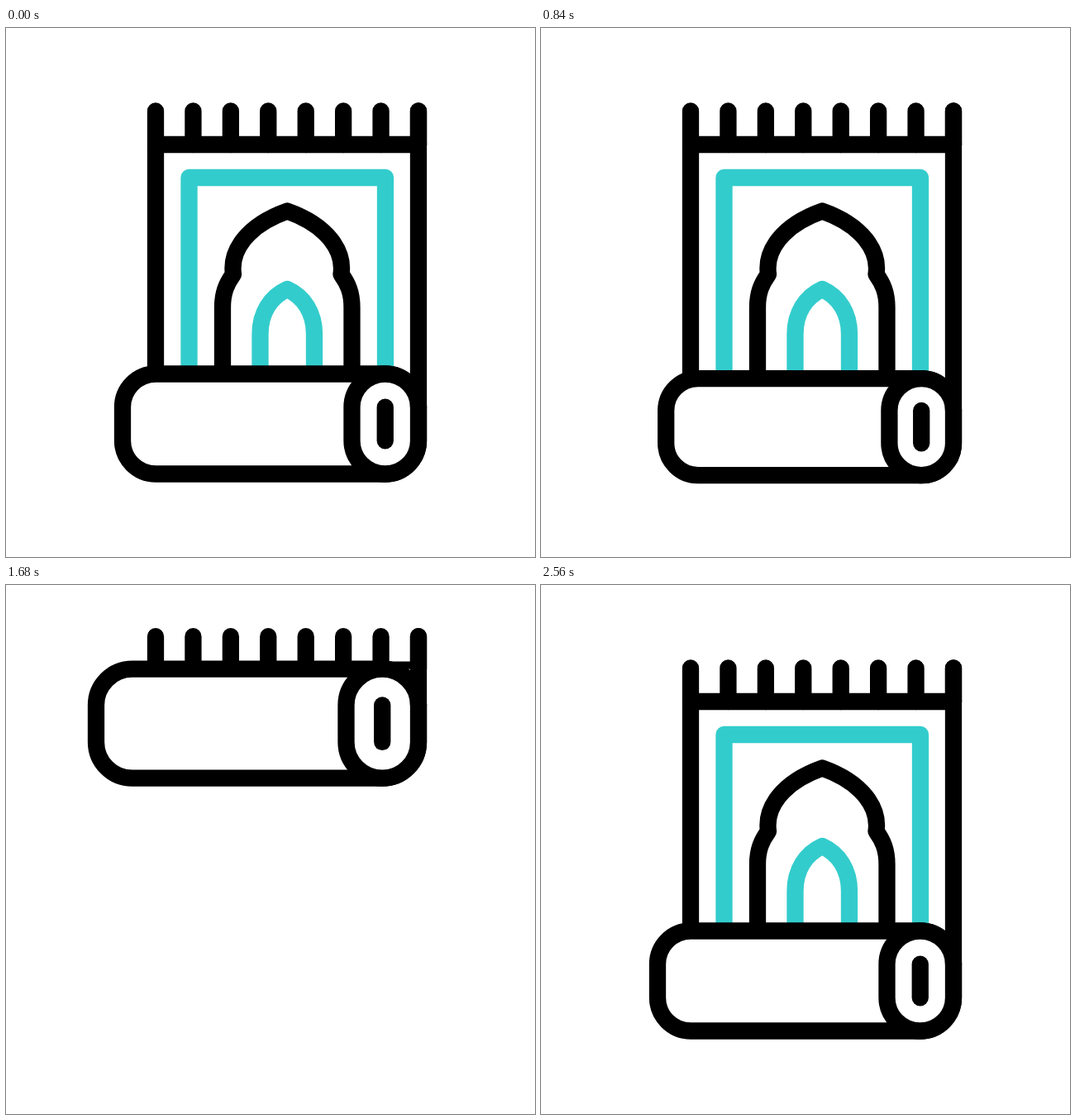
These frames come from a looping animation (640x640 px, 3000 ms). An HTML page:

```html
<!DOCTYPE html>
<html lang="en">
<head>
<meta charset="utf-8">
<title>Rolling rug</title>
<style>
  html, body { margin: 0; width: 100%; height: 100%; overflow: hidden; background: #fff; }
  svg { display: block; width: 100%; height: 100%; }
  .line { fill: none; stroke: #000; stroke-width: 20.3; stroke-linecap: round; stroke-linejoin: round; }
  .teal { stroke: #33cccc; }
  .solid { fill: #fff; }
</style>
</head>
<body>
<svg viewBox="0 0 640 640">
  <clipPath id="visible"><rect id="window" width="640" height="418"/></clipPath>
  <g id="rug">
    <g clip-path="url(#visible)">
      <path class="line" id="fringe"/>
      <path class="line" d="M181 700V141H499"/>
      <path class="line teal" d="M221.5 700V181H459V700"/>
      <path class="line" d="M262 700V338C262 320 267 309 275 298C271 270 291 239 340.3 221.5C389.5 239 409.5 270 405.5 298C413.5 309 418.5 320 418.5 338V700"/>
      <path class="line teal" d="M307.5 700V370C307.5 345 320 325 340.3 316C360.5 325 373 345 373 370V700"/>
    </g>
    <rect class="line solid" id="body"/>
    <rect class="line solid" id="end"/>
    <path class="line" id="core"/>
    <path class="line" id="edge"/>
  </g>
</svg>
<script>
const LOOP = 3000, STEP = 40, RIGHT = 499;
const $ = id => document.getElementById(id);
const set = (id, attrs) => {
  for (const name in attrs) $(id).setAttribute(name, attrs[name]);
};
const mix = (a, b, p) => a + (b - a) * p;
const smooth = u => u * u * (3 - 2 * u);

// Bezier ease with control points (a, 0) and (b, 1).
function ease(x, a, b) {
  let lo = 0, hi = 1;
  for (let i = 0; i < 24; i++) {
    const u = (lo + hi) / 2, v = 1 - u;
    if (3 * a * u * v * v + 3 * b * u * u * v + u * u * u < x) lo = u;
    else hi = u;
  }
  return smooth(lo);
}

// Roll poses relative to the rug: top, bottom, left, left of the end face.
const rest = [418.5, 539.5, 141, 418.5];
const low = [449.6, 565.3, 155, 422.3];
const rolled = [140, 272, 109, 411.5];

// Each move: start, end, value from, value to, ease points.
const rollMoves = [
  [200, 580, rest, low, 1 / 3, 2 / 3],
  [680, 1560, low, rolled, .48, .05],
  [1760, 2420, rolled, rest, .43, 0]
];
const liftMoves = [
  [895, 1546, [0], [-38.3], 1 / 3, 2 / 3],
  [1812, 2470, [-38.3], [0], 1 / 3, 2 / 3]
];

function valueAt(moves, t) {
  let value = moves[0][2];
  for (const [start, end, from, to, a, b] of moves) {
    if (t < start) break;
    const x = Math.min(1, (t - start) / (end - start));
    const p = x < 1 ? ease(x, a, b) : 1;
    value = from.map((n, i) => mix(n, to[i], p));
  }
  return value;
}

$("fringe").setAttribute("d", Array.from({ length: 8 }, (_, i) =>
  `M${181 + i * 318 / 7} 100.5V141`).join(""));

function draw(t) {
  const [top, bottom, left, face] = valueAt(rollMoves, t);
  const [lift] = valueAt(liftMoves, t);
  const r = (RIGHT - face) / 2, height = bottom - top;
  const box = x => ({ x, y: top, width: RIGHT - x, height, rx: r, ry: r });
  set("rug", { transform: `translate(0 ${lift})` });
  set("window", { height: top });
  set("body", box(left));
  set("end", box(face));
  set("core", { d: `M${face + r} ${top + r}V${bottom - r}` });
  set("edge", { d: `M${RIGHT} 100.5V${top + r}` });
}

const begin = performance.now();
function tick() {
  const t = (performance.now() - begin) % LOOP;
  draw(Math.floor(t / STEP) * STEP);
  requestAnimationFrame(tick);
}
tick();
</script>
</body>
</html>
```
